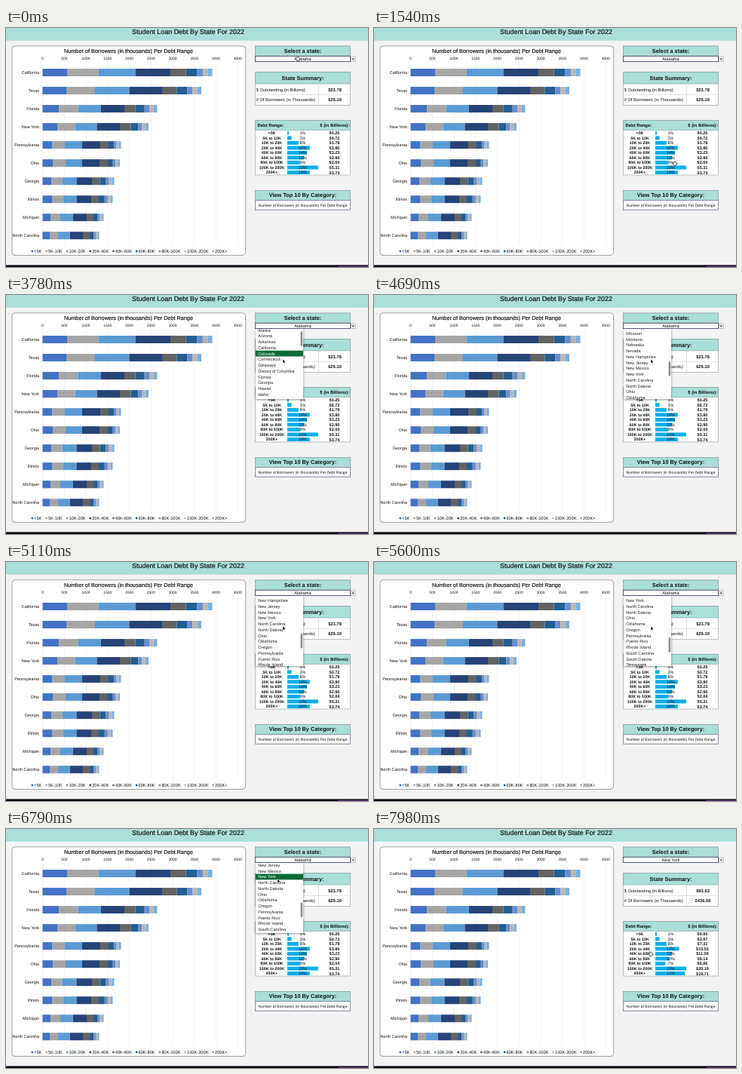
An HTML page that plays this animation: 480x317 px, repeating every 8 s.

```html
<!DOCTYPE html>
<html lang="en">
<head>
<meta charset="utf-8">
<title>Student Loan Debt Dashboard</title>
<style>
html, body { margin: 0; width: 100%; height: 100%; overflow: hidden; background: #f3f3f3; }
svg { display: block; width: 480px; height: 317px; }
text { font-family: "Liberation Sans", Arial, sans-serif; fill: #111; text-rendering: geometricPrecision; white-space: pre; }
.b { font-weight: bold; }
.medium { stroke: #111; stroke-width: .18px; }
#menuBox { filter: drop-shadow(0 1px 1.5px rgba(0, 0, 0, .45)); }
</style>
</head>
<body>
<svg viewBox="0 0 480 317">
  <defs><clipPath id="view"><rect x="331" y="45" width="63" height="93"/></clipPath></defs>
  <g id="sheet"></g>
  <g id="menu">
    <rect id="menuBox" x="331" y="45" width="63" height="93" fill="#fff"/>
    <g clip-path="url(#view)">
      <g id="list"><rect id="mark" x="331" width="63" height="7.75" fill="#0d6b3a"/></g>
      <rect id="thumb" x="390.6" width="2.6" height="19.5" rx="1.3" fill="#8b8b8b"/>
    </g>
  </g>
  <path id="cross" d="M-1-3H1V-1H3V1H1V3H-1V1H-3V-1H-1Z" fill="#fff" stroke="#222" stroke-width=".6"/>
  <path id="arrow" d="M0 0V5.6L1.3 4.4 2.2 6.5 3.1 6.1 2.2 4.1H4Z" fill="#111" stroke="#fff" stroke-width=".5"/>
</svg>
<script>
const NS = 'http://www.w3.org/2000/svg';
const $ = id => document.getElementById(id);
const sheet = $('sheet');

function add(tag, attrs, parent = sheet) {
  const el = document.createElementNS(NS, tag);
  for (const k in attrs) el.setAttribute(k, attrs[k]);
  parent.appendChild(el);
  return el;
}
const rect = (x, y, width, height, fill, more) => add('rect', { x, y, width, height, fill, ...more });

// y is the middle of the capital letters
function text(str, x, y, size, anchor = 'start', style = '', parent = sheet) {
  const el = add('text', { x, y: y + size * 0.36, 'font-size': size, 'text-anchor': anchor, class: style }, parent);
  el.textContent = str;
  return el;
}

const TEAL = '#a9dfd8';
const edge = { stroke: '#8a9a9a', 'stroke-width': 0.6 };

// Banner and bottom strip
rect(0, 0, 480, 16.7, TEAL);
text('Student Loan Debt By State For 2022', 241.5, 5, 8.93, 'middle', 'medium');
rect(0, 314.4, 480, 2.6, '#0c0812');
rect(440, 315.8, 40, 1.2, '#5b3a78');

// Stacked bar chart
rect(8, 23.8, 309.6, 277.7, '#fff', { rx: 4, stroke: '#8c8c8c', 'stroke-width': 0.8 });
text('Number of Borrowers (in thousands) Per Debt Range', 162.5, 30.3, 7.26, 'middle', 'medium');
for (let i = 0; i < 10; i++) {
  const x = 48.6 + i * 28.75;
  rect(x - 0.25, 47, 0.5, 240, '#e6e6e6');
  text(i * 500, x, 40, 4.95, 'middle');
}

const colors = ['#4472c4', '#a5a5a5', '#5b9bd5', '#264478', '#636363', '#255e91', '#698ed0', '#b7b7b7', '#7cafdd'];
const bars = [
  ['California', 81, 122.5, 172, 218, 238.5, 273.5],
  ['Texas', 80, 118, 163.5, 207, 226.5, 259],
  ['Florida', 70.5, 95.5, 126, 157, 171.5, 200.5],
  ['New York', 68, 91.5, 120.5, 151, 165.5, 189],
  ['Pennsylvania', 61.5, 78, 101, 125, 136, 152.5],
  ['Ohio', 62, 79, 101, 124, 135, 151],
  ['Georgia', 60.5, 74.5, 93.5, 114, 124.5, 143.5],
  ['Illinois', 61, 75.5, 93.5, 113, 123, 141.5],
  ['Michigan', 59.5, 72, 89, 107, 116, 129.5],
  ['North Carolina', 58, 69, 85, 102, 111, 123.5]
];
bars.forEach(([name, ...ends], row) => {
  const y = 59 + row * 24.03;
  text(name, 44, y, 5.5, 'end');
  const last = ends.pop(), from = ends[4];
  for (const part of [0.42, 0.64, 0.84, 1]) ends.push(from + (last - from) * part);
  let x = 48.5;
  ends.forEach((end, i) => {
    rect(x, y - 5, end - x, 10, colors[i]);
    x = end;
  });
});

// Legend
const ranges = ['<5K', '5K-10K', '10K-20K', '20K-40K', '40K-60K', '60K-80K', '80K-100K', '100K-200K', '200K+'];
const widths = [1.81, 3.34, 3.89, 3.89, 3.89, 3.89, 4.45, 5, 2.92];
let legendX = 33.5;
ranges.forEach((name, i) => {
  rect(legendX, 294.8, 2.5, 2.5, colors[i]);
  text(name, legendX + 3.6, 296, 5.7);
  legendX += widths[i] * 5.7 + 8.5;
});

// Side panels
function panel(y, head, body, title, titleY) {
  rect(330.5, y, 126, head + body, '#fff', edge);
  rect(330.5, y, 126, head, TEAL, edge);
  if (title) text(title, 393.5, titleY, 7.35, 'middle', 'b');
}
const field = { stroke: '#3a3f5c', 'stroke-width': 0.8 };

panel(24, 13, 7.7, 'Select a state:', 30.6);
rect(330.5, 37.3, 126, 7.3, '#fff', field);
const chosen = text('', 393.5, 41, 5.7, 'middle');
rect(457.2, 38, 6, 6.6, '#ececec', { stroke: '#999', 'stroke-width': 0.5 });
add('path', { d: 'M458.6 40.6H461.8L460.2 42.7Z', fill: '#444' });

panel(58.5, 15.5, 28.5, 'State Summary:', 66.3);
add('path', { d: 'M330.5 88.4H456.5M414.5 74V102.5', stroke: '#c8c8c8', 'stroke-width': 0.5 });
text('$ Outstanding (in Billions):', 331.7, 81.5, 5.7);
text('# Of Borrowers (in Thousands):', 331.7, 95.3, 5.7);
const total = text('', 436, 81.5, 5.8, 'middle', 'b');
const people = text('', 436, 95.3, 5.8, 'middle', 'b');

panel(122.5, 13, 59.5);
text('Debt Range:', 333.5, 128.8, 5.9, 'start', 'b');
text('$ (in Billions):', 455.2, 128.8, 5.9, 'end', 'b');
const rows = ranges.map((name, i) => {
  const y = 139.3 + i * 6.53;
  text(name.replace('-', ' to '), 352.5, y, 5.3, 'middle', 'b');
  return {
    bar: rect(373, y - 2.5, 0, 5, '#09aeea'),
    pct: text('', 393.3, y, 5.4, 'middle'),
    sum: text('', 435.5, y, 5.5, 'middle', 'b')
  };
});

panel(215.5, 13, 12.7, 'View Top 10 By Category:', 221.8);
rect(330.5, 228.5, 126, 12.7, '#fff', { stroke: '#6f7796', 'stroke-width': 0.8 });
text('Number of Borrowers (in thousands) Per Debt Range', 393.5, 234.7, 5, 'middle');

const data = {
  'Alabama': {
    total: '$23.78', people: '629.10',
    pct: [1, 3, 8, 16, 14, 12, 9, 22, 16],
    sum: [0.25, 0.72, 1.79, 3.8, 3.23, 2.9, 2.04, 5.31, 3.74]
  },
  'New York': {
    total: '$93.63', people: '2436.50',
    pct: [1, 3, 8, 17, 12, 10, 7, 22, 21],
    sum: [0.93, 2.87, 7.31, 15.53, 11.09, 9.14, 6.86, 20.19, 19.71]
  }
};
let shown;
function show(name) {
  if (name === shown) return;
  shown = name;
  const d = data[name];
  chosen.textContent = name;
  total.textContent = d.total;
  people.textContent = d.people;
  rows.forEach((r, i) => {
    r.bar.setAttribute('width', d.pct[i] * 1.86);
    r.pct.textContent = d.pct[i] + '%';
    r.sum.textContent = '$' + d.sum[i].toFixed(2);
  });
}

// Drop-down list
const PITCH = 7.75, TOP = 49.4;
const states = ('Alabama,Alaska,Arizona,Arkansas,California,Colorado,Connecticut,Delaware,District of Columbia,' +
  'Florida,Georgia,Hawaii,Idaho,Illinois,Indiana,Iowa,Kansas,Kentucky,Louisiana,Maine,Maryland,Massachusetts,' +
  'Michigan,Minnesota,Mississippi,Missouri,Montana,Nebraska,Nevada,New Hampshire,New Jersey,New Mexico,New York,' +
  'North Carolina,North Dakota,Ohio,Oklahoma,Oregon,Pennsylvania,Puerto Rico,Rhode Island,South Carolina,' +
  'South Dakota,Tennessee,Texas,Utah,Vermont,Virginia,Washington,West Virginia,Wisconsin,Wyoming').split(',');
const items = states.map((name, i) => text(name, 334.2, TOP + i * PITCH, 5.6, 'start', '', $('list')));

// Motion: [time, values...], eased between stops
const LOOP = 8000, OPEN = 2800, SCROLL = 3615, HOVER = 6100, PICK = 7070;
const pointer = [
  [0, 387, 41], [150, 387, 41], [600, 418, 88], [850, 418, 92], [1400, 399, 180], [1700, 399, 180],
  [2450, 460, 41], [3050, 460, 41], [3600, 367, 85], [5900, 367, 85], [6500, 360, 66],
  [7150, 360, 66], [7800, 367, 166], [LOOP, 367, 166]
];
const scroll = [[0, 0], [SCROLL, 0], [4800, 197], [5400, 246.4], [5750, 246.4], [6250, 234], [LOOP, 234]];

function at(stops, t) {
  let i = 1;
  while (i < stops.length - 1 && t >= stops[i][0]) i++;
  const a = stops[i - 1], b = stops[i];
  const k = (t - a[0]) / (b[0] - a[0]);
  const e = k * k * (3 - 2 * k);
  return a.slice(1).map((v, n) => v + (b[n + 1] - v) * e);
}

function draw(now) {
  const t = now % LOOP;
  const [x, y] = at(pointer, t);
  const [s] = at(scroll, t);
  const open = t >= OPEN && t < PICK;
  show(t < PICK ? 'Alabama' : 'New York');

  $('menu').style.display = open ? '' : 'none';
  if (open) {
    let hot = 0;
    const under = Math.round((y + s - TOP) / PITCH);
    if (t >= HOVER) hot = under;
    else if (t >= SCROLL) hot = 5;
    else if (x < 394) hot = Math.max(0, under);
    $('list').setAttribute('transform', `translate(0 ${-s})`);
    $('mark').setAttribute('y', TOP + (hot - 0.5) * PITCH);
    $('thumb').setAttribute('y', 46 + s * 0.22);
    items.forEach((el, i) => { el.style.fill = i === hot ? '#fff' : '#222'; });
  }

  const pointing = open || x > 457;
  $('arrow').style.display = pointing ? '' : 'none';
  $('cross').style.display = pointing ? 'none' : '';
  $(pointing ? 'arrow' : 'cross').setAttribute('transform', `translate(${x} ${y})`);
  requestAnimationFrame(draw);
}
draw(performance.now());
</script>
</body>
</html>
```
